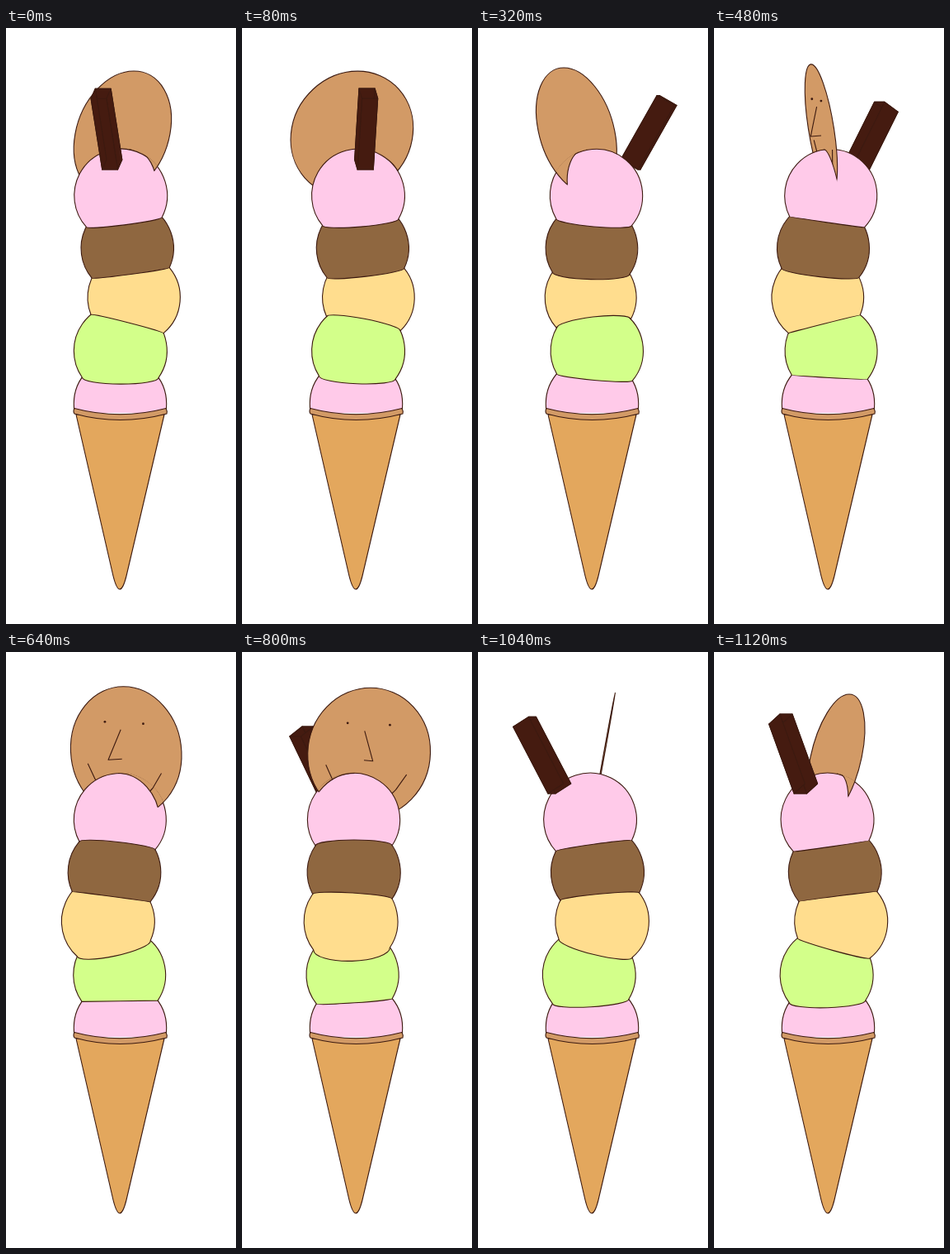
An HTML page with a canvas that plays this animation: 279 px wide and 720 px high, repeating every 1.2 s.

```html
<!DOCTYPE html>
<html>
<head>
<meta charset="utf-8">
<style>
html, body { margin: 0; width: 100%; height: 100%; overflow: hidden; background: #fff; }
canvas { display: block; }
</style>
</head>
<body>
<canvas id="stage" width="279" height="720"></canvas>
<script>
const W = 279, H = 720, STEPS = 15, STEP_MS = 80;
const ctx = document.getElementById('stage').getContext('2d');
const { sin, cos, PI, hypot, asin, atan2, abs, sqrt } = Math;
const INK = '#3c1a10', WAFER = '#d29a66', CONE = '#e3a75d', FLAKE = '#451b10';
const TURN = 2 * PI / STEPS;

// Scoops from bottom to top; each one circles the vertical axis.
const scoops = [
  { x: 138.5, y: 454, swing: 0, phase: 0, color: '#ffcae9' },
  { x: 138.8, y: 390, swing: 5.5, phase: 0, color: '#d3ff8a' },
  { x: 139.2, y: 325.5, swing: 16, phase: PI / 2 + .06, color: '#ffdd8e' },
  { x: 139.2, y: 266, swing: 8, phase: PI / 2 + .06, color: '#8f6740' },
  { x: 139.2, y: 202.5, swing: 4.3, phase: 0, color: '#ffcae9' }
];

const unit = new Path2D();
unit.arc(0, 0, 1, 0, 2 * PI);
const smile = new Path2D('M-.7 .18L-.58 .42Q-.3 .7 0 .75Q.3 .72 .45 .56L.62 .33');
const cone = new Path2D('M85 467L130 662Q134 678 138 678Q142 678 146 662L192 467Z');
const rim = new Path2D('M83 459.5Q138 474 194 459.5Q196 463 195 466Q138 481 83 466Q81 463 83 459.5Z');

function place(path, matrix) {
  const p = new Path2D();
  p.addPath(path, new DOMMatrix(matrix));
  return p;
}

function paint(path, color) {
  ctx.fillStyle = color;
  ctx.fill(path);
  ctx.stroke(path);
}

function ballAt(s, angle) {
  const a = angle + s.phase, z = s.swing * cos(a);
  return { x: s.x + s.swing * sin(a), y: s.y, z, r: 56.2 + z * .05, color: s.color };
}

function drawBase(ball) {
  ctx.save();
  ctx.beginPath();
  ctx.rect(0, 0, W, 465);
  ctx.clip();
  paint(place(unit, [ball.r, 0, 0, ball.r, ball.x, ball.y]), ball.color);
  ctx.restore();
  paint(cone, CONE);
  paint(rim, WAFER);
}

// A ball joined to the one below along the front half of their shared ring.
function drawScoop(up, low) {
  const dx = low.x - up.x, dy = low.y - up.y, d = hypot(dx, dy);
  const off = (d * d + up.r ** 2 - low.r ** 2) / (2 * d);
  const half = sqrt(up.r ** 2 - off * off), edge = asin(off / up.r);
  const pitch = ((up.y + low.y) / 2 - 234) * .00045;
  const bow = half * ((up.z - low.z) / d + pitch);
  const p = new Path2D();
  p.arc(0, 0, up.r, edge, PI - edge, true);
  p.ellipse(0, off, half, abs(bow), 0, PI, bow > 0 ? 0 : 2 * PI, bow > 0);
  p.closePath();
  ctx.save();
  ctx.translate(up.x, up.y);
  ctx.rotate(atan2(-dx, dy));
  paint(p, up.color);
  ctx.restore();
}

function waferAt(k) {
  const a = k * TURN, spin = (k - 9.27) * TURN, c = cos(spin), s = sin(spin);
  const tall = 77.2 + 1.8 * c, lean = (14 - 8.5 * c) * s;
  const x = 139.5 + 18 * cos((k - 11.2) * TURN) + 2.3 * cos(2 * a);
  const y = 47 + 5.2 * cos((k - .7) * TURN) + tall;
  return { c, s, lean, matrix: [78 * c, 0, -lean, tall, x, y] };
}

function drawWafer({ c, s, matrix }) {
  paint(place(unit, matrix), WAFER);
  if (c < .1) return;
  const [ax, , bx, by, x, y] = matrix;
  const at = (u, v) => [x + u * ax + v * bx, y + v * by];
  ctx.fillStyle = INK;
  for (const eye of [at(-.36, -.46), at(.33, -.43)]) {
    ctx.beginPath();
    ctx.arc(...eye, 1.4, 0, 2 * PI);
    ctx.fill();
  }
  const foot = at(-.08, .11);
  const stickOut = 7 * s + 15 * sin(2 * atan2(s, c));
  ctx.beginPath();
  ctx.moveTo(...at(-.08, -.34));
  ctx.lineTo(foot[0] + stickOut, foot[1] + 1);
  ctx.lineTo(...foot);
  ctx.stroke();
  ctx.stroke(place(smile, matrix));
}

// The near side of the wafer, cut where it enters the top scoop.
function drawWaferFront(wafer, ball) {
  const { c, s, lean, matrix } = wafer, r = ball.r;
  const cut = [r * c, 0, -lean * .74, r, ball.x, ball.y];
  const side = new Path2D(), outside = new Path2D();
  side.rect(s < 0 ? 0 : -9, -2, 9, 3);
  outside.rect(0, 0, W, H);
  outside.addPath(unit, new DOMMatrix(cut));
  ctx.save();
  ctx.clip(place(unit, [r + .8, 0, 0, r + .8, ball.x, ball.y]));
  ctx.clip(place(side, cut));
  ctx.save();
  ctx.clip(outside, 'evenodd');
  drawWafer(wafer);
  ctx.restore();
  ctx.clip(place(unit, matrix));
  ctx.stroke(place(unit, cut));
  ctx.restore();
}

// A slanted square bar, drawn as the six faces of a box.
function drawFlake(angle, ball) {
  const s = sin(angle), c = cos(angle);
  const corners = (x, y) => [[-1, -1], [1, -1], [1, 1], [-1, 1]].map(([u, v]) =>
    [x + u * 9.7 * c + v * 10.6 * s, y + v * 6]);
  const top = corners(138 + 92 * s, 89 - 10 * c);
  const end = corners(ball.x + 42 * s, 165);
  const faces = [top, end];
  for (let i = 0; i < 4; i++) {
    const j = (i + 1) % 4;
    faces.push([top[i], top[j], end[j], end[i]]);
  }
  ctx.fillStyle = FLAKE;
  for (const face of faces) {
    ctx.beginPath();
    face.forEach(p => ctx.lineTo(...p));
    ctx.closePath();
    ctx.fill();
    ctx.stroke();
  }
}

function draw(k) {
  ctx.fillStyle = '#fff';
  ctx.fillRect(0, 0, W, H);
  ctx.strokeStyle = INK;
  ctx.lineWidth = 1.1;
  ctx.lineJoin = 'round';
  const balls = scoops.map(s => ballAt(s, k * TURN));
  const top = balls[4], wafer = waferAt(k);
  const flakeAngle = (k - .6) * TURN, flakeInFront = cos(flakeAngle) > .2;
  if (!flakeInFront) drawFlake(flakeAngle, top);
  drawWafer(wafer);
  drawBase(balls[0]);
  for (let i = 1; i < balls.length; i++) drawScoop(balls[i], balls[i - 1]);
  drawWaferFront(wafer, top);
  if (flakeInFront) drawFlake(flakeAngle, top);
}

const start = performance.now();
function tick() {
  draw(Math.floor((performance.now() - start) / STEP_MS) % STEPS);
  requestAnimationFrame(tick);
}
tick();
</script>
</body>
</html>
```
